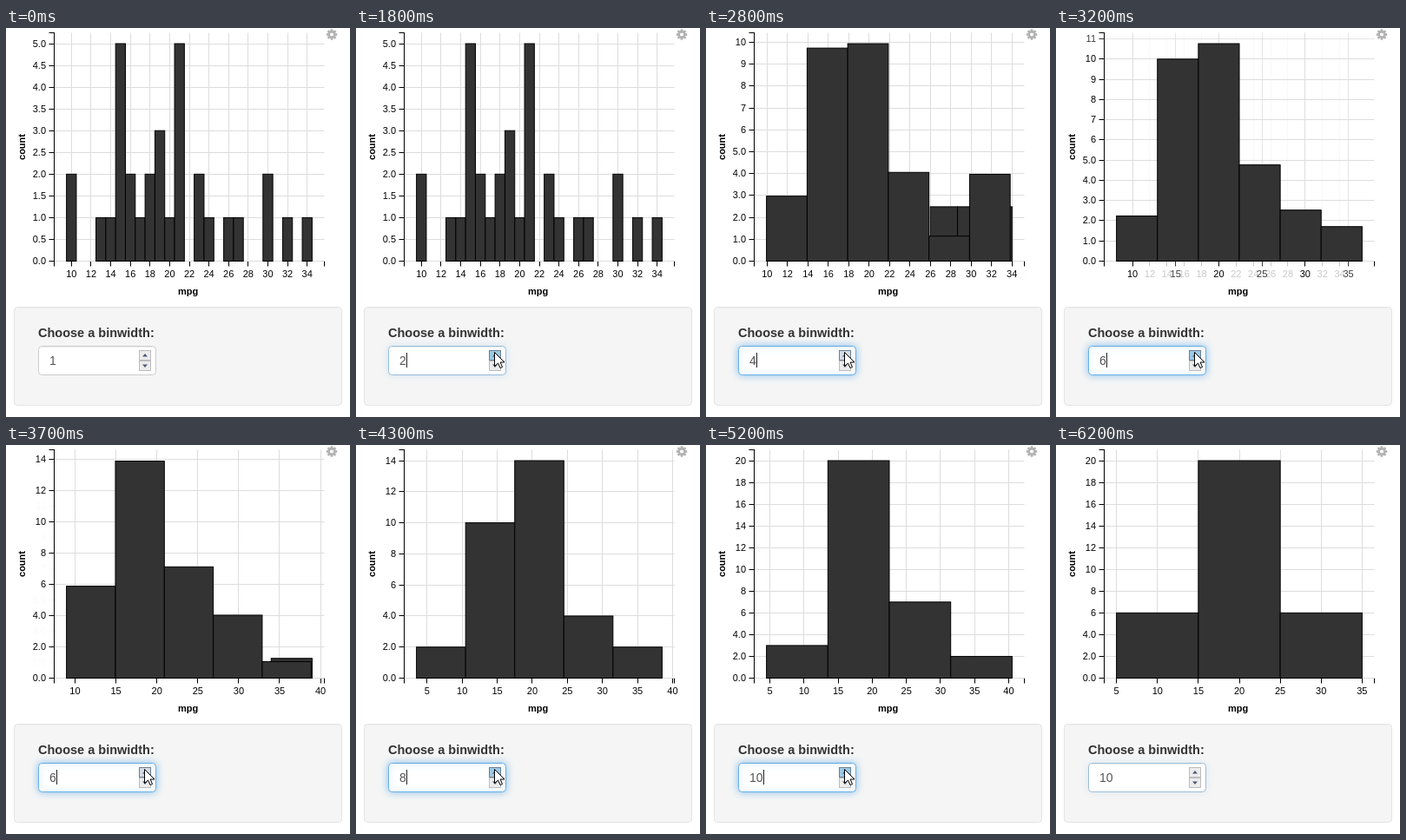
An HTML page with a canvas that plays this animation: 396x448 px, repeating every 6.3 s.

```html
<!DOCTYPE html>
<html lang="en">
<head>
<meta charset="utf-8">
<title>Histogram binwidth</title>
<style>
html, body { margin: 0; width: 100%; height: 100%; overflow: hidden; background: #fff; }
canvas { display: block; }
</style>
</head>
<body>
<canvas id="stage" width="396" height="448"></canvas>
<script>
const ctx = document.getElementById('stage').getContext('2d');
const SANS = '"Liberation Sans", Arial, sans-serif';
const LOOP = 6300, STEP = 100, MORPH = 250;
const LEFT = 55.5, RIGHT = 366.5, TOP = 5.5, BASE = 268.5;

const mpg = [21, 21, 22.8, 21.4, 18.7, 18.1, 14.3, 24.4, 22.8, 19.2, 17.8,
  16.4, 17.3, 15.2, 10.4, 10.4, 14.7, 32.4, 30.4, 33.9, 21.5, 15.5, 15.2,
  13.3, 19.2, 27.3, 26, 30.4, 15.8, 19.7, 15, 21.4];

// Time at which each binwidth is entered, and when the plot reacts to it
const clicks = [0, 1800, 1950, 2400, 2850, 3200, 3750, 4200, 4650, 5100];
const redraws = [-999, 1880, 2145, 2595, 3045, 3495, 3945, 4395, 4845, 5250];

const clamp = v => Math.max(0, Math.min(1, v));
const lerp = (a, b, p) => a + (b - a) * p;
const cubic = p => p < .5 ? 4 * p ** 3 : 1 - 4 * (1 - p) ** 3;
const crisp = v => Math.floor(v) + .5;
const latest = (times, t) => times.filter(s => s <= t).length - 1;

function ticks(lo, hi) {
  const span = hi - lo;
  let step = 10 ** Math.floor(Math.log10(span / 10));
  const err = 10 / span * step;
  step *= err <= .15 ? 10 : err <= .35 ? 5 : err <= .75 ? 2 : 1;
  const list = [];
  for (let k = Math.ceil(lo / step); k * step <= hi; k++) list.push(Math.round(k * step * 10) / 10);
  return list;
}

function histogram(w) {
  const bin = v => Math.ceil((v - w / 2) / w);
  const first = bin(Math.min(...mpg)), last = bin(Math.max(...mpg));
  const counts = Array(last - first + 1).fill(0);
  mpg.forEach(v => counts[bin(v) - first]++);
  const start = w / 2 + (first - 1) * w, range = counts.length * w;
  const lo = start - range * .05, hi = start + range * 1.05;
  const max = Math.max(...counts) * 1.05;
  const x = v => LEFT + (v - lo) / (hi - lo) * (RIGHT - LEFT);
  const y = v => BASE - v / max * (BASE - TOP);
  const bars = counts.map((n, i) => [x(start + i * w), y(n), x(start + (i + 1) * w)]);
  return { x, y, bars, xTicks: ticks(lo, hi), yTicks: ticks(0, max) };
}

const plots = redraws.map((_, i) => histogram(i + 1));

function line(x1, y1, x2, y2, color) {
  ctx.strokeStyle = color;
  ctx.lineWidth = 1;
  ctx.beginPath();
  ctx.moveTo(x1, y1);
  ctx.lineTo(x2, y2);
  ctx.stroke();
}

function text(str, x, y, font, color = '#000', align = 'center') {
  ctx.font = font + ' ' + SANS;
  ctx.fillStyle = color;
  ctx.textAlign = align;
  ctx.fillText(str, x, y);
}

function poly(points, fill) {
  ctx.fillStyle = fill;
  ctx.beginPath();
  points.forEach(([x, y]) => ctx.lineTo(x, y));
  ctx.closePath();
  ctx.fill();
}

function roundBox(x, y, w, h, r, fill, stroke) {
  ctx.beginPath();
  ctx.roundRect(x, y, w, h, r);
  ctx.fillStyle = fill;
  ctx.fill();
  ctx.strokeStyle = stroke;
  ctx.lineWidth = 1;
  ctx.stroke();
}

// Calls draw(value, position) for shared, entering and leaving ticks
function eachTick(from, to, p, axis, draw) {
  const a = from[axis + 'Ticks'], b = to[axis + 'Ticks'];
  new Set([...a, ...b]).forEach(v => {
    ctx.globalAlpha = !b.includes(v) ? 1 - p : !a.includes(v) ? p : 1;
    if (ctx.globalAlpha > .01) draw(v, lerp(from[axis](v), to[axis](v), p));
  });
  ctx.globalAlpha = 1;
}

function drawBar([x1, y, x2]) {
  if (BASE - y < .3) return;
  ctx.fillStyle = '#333';
  ctx.strokeStyle = '#000';
  ctx.lineWidth = 1;
  ctx.fillRect(x1, y, x2 - x1, BASE - y);
  ctx.strokeRect(x1, y, x2 - x1, BASE - y);
}

function drawPlot(t) {
  const i = latest(redraws, t);
  const to = plots[i], from = plots[Math.max(0, i - 1)];
  const p = cubic(clamp((t - redraws[i]) / MORPH));

  eachTick(from, to, p, 'x', (v, x) => {
    line(crisp(x), TOP, crisp(x), BASE, '#ddd');
    line(crisp(x), BASE, crisp(x), BASE + 6, '#000');
    text(v, x, 287, '11px');
  });
  line(LEFT, BASE, LEFT, BASE + 6, '#000');
  line(RIGHT, BASE, RIGHT, BASE + 6, '#000');

  eachTick(from, to, p, 'y', (v, y) => {
    line(LEFT, crisp(y), RIGHT, crisp(y), '#ddd');
    line(LEFT - 6, crisp(y), LEFT, crisp(y), '#000');
    text(v <= 5 ? v.toFixed(1) : v, 46, y + 3.5, '11px', '#000', 'right');
  });
  line(LEFT, TOP - .5, LEFT, BASE + .5, '#000');
  line(LEFT - 6, TOP, LEFT, TOP, '#000');

  text('mpg', 209.5, 307, 'bold 11px');
  ctx.save();
  ctx.translate(22, 137);
  ctx.rotate(-Math.PI / 2);
  text('count', 0, 0, 'bold 11px');
  ctx.restore();

  if (p < 1) from.bars.slice(to.bars.length).forEach(drawBar);
  to.bars.forEach((bar, k) => {
    const old = from.bars[k] || bar;
    drawBar(bar.map((v, j) => lerp(old[j], v, p)));
  });
}

function drawGear() {
  ctx.save();
  ctx.translate(375, 7.5);
  ctx.fillStyle = '#b3b3b3';
  for (let k = 0; k < 8; k++) {
    ctx.fillRect(-1.4, -6.2, 2.8, 4);
    ctx.rotate(Math.PI / 4);
  }
  ctx.strokeStyle = '#b3b3b3';
  ctx.lineWidth = 2.6;
  ctx.beginPath();
  ctx.arc(0, 0, 3.4, 0, 7);
  ctx.stroke();
  ctx.restore();
}

function drawSpinner(hover, pressed) {
  for (const dir of [-1, 1]) {
    const y = dir < 0 ? 371.5 : 383.5;
    const hot = hover && dir < 0;
    ctx.fillStyle = hot ? (pressed ? '#9cc9e6' : '#d3dce6') : '#ececec';
    ctx.fillRect(153.5, y, 13, 11);
    ctx.strokeStyle = hot ? '#6d7f90' : '#bcbcbc';
    ctx.lineWidth = 1;
    ctx.strokeRect(153.5, y, 13, 11);
    const c = y + 5.5;
    poly([[157, c - dir * 1.5], [163, c - dir * 1.5], [160, c + dir * 2]], '#4c5a78');
  }
}

function drawPanel(t) {
  roundBox(9.5, 321.5, 377, 113, 4, '#f5f5f5', '#e3e3e3');
  line(12, 322.5, 384, 322.5, '#efefef');
  text('Choose a binwidth:', 37, 356, 'bold 14.5px', '#333', 'left');

  const focus = clamp((t - 1730) / 130) * (1 - clamp((t - 6120) / 150));
  ctx.save();
  ctx.shadowColor = `rgba(102,175,233,${.75 * focus ** 2})`;
  ctx.shadowBlur = 8;
  const edge = [[204, 102], [204, 175], [204, 233]].map(([a, b]) => lerp(a, b, focus));
  roundBox(37.5, 366.5, 135, 33, 4, '#fff', `rgb(${edge})`);
  ctx.restore();
  line(40, 367.5, 170, 367.5, '#eee');

  const i = latest(clicks, t);
  text(i + 1, 50, 388, '14px', '#555', 'left');
  if (t >= 1800 && t < 5600) {
    const x = i === 9 ? 66.5 : 58.5;
    line(x, 374, x, 391, '#222');
  }
  drawSpinner(t >= 900 && t < 5400, i > 0 && t - clicks[i] < 200);
}

// Pointer waypoints: time, x, y
const path = [[300, 378, 431], [500, 305, 412], [700, 215, 385], [900, 165, 368],
  [1200, 165, 368], [1500, 159, 373], [5300, 159, 373], [5500, 128, 389], [5700, 80, 450]];

function drawPointer(t) {
  if (t < 300 || t >= 5700) return;
  const k = path.findIndex(q => q[0] > t);
  const a = path[k - 1], b = path[k];
  const p = (t - a[0]) / (b[0] - a[0]);
  ctx.save();
  ctx.translate(Math.round(lerp(a[1], b[1], p)) + .5, Math.round(lerp(a[2], b[2], p)) + .5);
  poly([[0, 0], [0, 16], [4, 12.5], [6.5, 18], [9, 17], [6.6, 11.5], [11.5, 11.5]], '#fff');
  ctx.strokeStyle = '#000';
  ctx.lineWidth = 1;
  ctx.stroke();
  ctx.restore();
}

function frame(now) {
  const t = Math.floor(now % LOOP / STEP) * STEP;
  ctx.fillStyle = '#fff';
  ctx.fillRect(0, 0, 396, 448);
  drawPlot(t);
  drawGear();
  drawPanel(t);
  drawPointer(t);
  requestAnimationFrame(frame);
}
requestAnimationFrame(frame);
</script>
</body>
</html>
```
